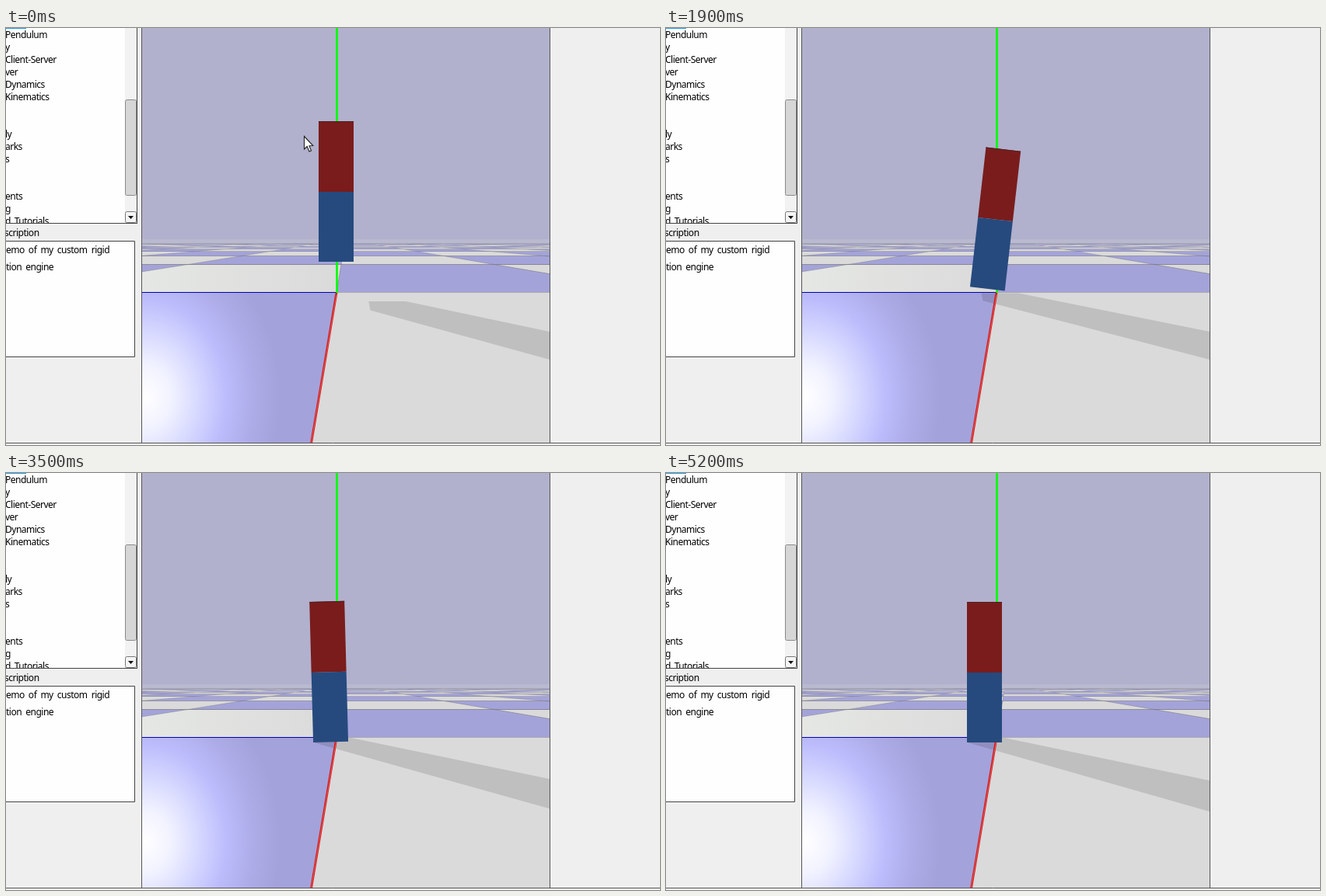
These frames come from a looping animation (841x537 px, 5300 ms). An HTML page with a canvas:

```html
<!DOCTYPE html>
<html lang="en">
<head>
<meta charset="utf-8">
<title>Rigid body demo</title>
<style>
  html, body { margin: 0; width: 100%; height: 100%; overflow: hidden; background: #efefef; }
  canvas { display: block; }
</style>
</head>
<body>
<canvas id="stage" width="841" height="537"></canvas>
<script>
const ctx = document.getElementById('stage').getContext('2d');
const LOOP = 5300, STEP = 100, REST = 200;

const ROWS = ['Pendulum', 'y', 'Client-Server', 'ver', 'Dynamics', 'Kinematics', '', '',
  'ly', 'arks', 's', '', '', 'ents', 'g', 'd_Tutorials'];

// --- motion ---
const ramp = (t, from, to) => Math.min(1, Math.max(0, (t - from) / (to - from)));
const smooth = p => p * p * (3 - 2 * p);
const mix = (a, b, p) => a + (b - a) * p;
const drift = t => smooth(ramp(t, 2500, 4300));

// Free fall, a low hop, then sinking into contact.
function height(t) {
  if (t <= 800) return mix(210.5, 238.5, ramp(t, REST, 800) ** 2);
  if (t < 1900) {
    const q = ramp(t, 900, 1900);
    return 246 - 30 * q * (1 - q);
  }
  return 256.5 - 10.5 * Math.exp((1900 - t) / 546);
}

// Steady tilt while hopping, then a damped swing back upright.
function tilt(t) {
  const u = ramp(t, 2100, 4300);
  const deg = t < 2100
    ? 7.8 * ramp(t, 900, 2100)
    : 7.8 * Math.cos(Math.PI * u * 22 / 23) * (1 - u * u);
  return deg * Math.PI / 180;
}

function pose(t) {
  return {
    x: 424.5 - 1.5 * ramp(t, 900, 2500) - 13.5 * drift(t),
    y: height(t),
    angle: tilt(t)
  };
}

// --- drawing helpers ---
function rect(color, x, y, w, h) {
  ctx.fillStyle = color;
  ctx.fillRect(x, y, w, h);
}

function trace(pts) {
  ctx.beginPath();
  pts.forEach(([x, y]) => ctx.lineTo(x, y));
  ctx.closePath();
}

function poly(fill, ...pts) {
  trace(pts);
  ctx.fillStyle = fill;
  ctx.fill();
}

function line(color, width, x1, y1, x2, y2) {
  ctx.beginPath();
  ctx.moveTo(x1, y1);
  ctx.lineTo(x2, y2);
  ctx.strokeStyle = color;
  ctx.lineWidth = width;
  ctx.stroke();
}

function box(fill, border, x, y, w, h, r) {
  ctx.beginPath();
  ctx.roundRect(x + 0.5, y + 0.5, w - 1, h - 1, r);
  ctx.fillStyle = fill;
  ctx.fill();
  ctx.strokeStyle = border;
  ctx.lineWidth = 1;
  ctx.stroke();
}

function clipped(x, y, w, h, draw) {
  ctx.save();
  ctx.beginPath();
  ctx.rect(x, y, w, h);
  ctx.clip();
  draw();
  ctx.restore();
}

// --- floor in perspective ---
const VP = { x: 436.5, y: 272 };
const rowY = n => VP.y + 62.1 / (0.9 + n);
const colX = (k, y) => VP.x + (y - VP.y) * (6.05 * k - 0.166);

function drawFloor() {
  rect('#dadada', 175, 277, 525, 258);
  for (let n = 11; n >= 0; n--) {
    const far = Math.max(rowY(n + 1), 277), near = rowY(n);
    const reach = Math.ceil(270 / (6.05 * (far - VP.y))) + 1;
    const ink = `rgba(115,115,125,${0.7 / (1 + n * 0.3)})`;
    for (let k = -reach; k <= reach; k++) {
      if ((k + n) % 2 === 0) {
        poly('#a4a3d9', [colX(k, far), far], [colX(k + 1, far), far],
          [colX(k + 1, near), near], [colX(k, near), near]);
      }
      if (n < 5) line(ink, 0.8, colX(k, far), far, colX(k, near), near);
    }
    const edge = Math.floor(far) + 0.5;
    line(ink, 1, 175, edge, 700, edge);
  }
  line('#a9a9b4', 1, 425, 340.5, 700, 340.5);

  const sheen = ctx.createLinearGradient(175, 0, 425, 0);
  sheen.addColorStop(0, 'rgba(236,240,234,.6)');
  sheen.addColorStop(1, 'rgba(236,240,234,0)');
  poly(sheen, [175, 314], [colX(-1, 305), 305], [430, 305], [425, 340], [175, 340]);
}

function drawGlow() {
  ctx.save();
  trace([[175, 341], [425, 341], [393, 535], [175, 535]]);
  ctx.clip();
  ctx.translate(178, 475);
  ctx.scale(1, 1.2);
  const glow = ctx.createRadialGradient(0, 0, 0, 0, 0, 175);
  ['#ffffff', '#f1f2ff', '#d6d8ff', '#bcbcfc', '#adace8', '#a4a2da']
    .forEach((color, i) => glow.addColorStop(i / 5, color));
  rect(glow, -10, -180, 270, 360);
  ctx.restore();
}

// The tip follows the foot of the stack and slides out with its lift.
function drawShadow(t, body) {
  const lift = 256.5 - body.y;
  const x = body.x - 90 * Math.sin(body.angle) - 22.5 + 1.4 * lift;
  const y = 341 + 0.0052 * lift * lift;
  poly('rgba(0,0,0,.125)', [x, y], [x + 48, y],
    [699, 391 + 5 * drift(t)], [699, 427 + 9 * drift(t)], [x + 2, 347.5 + 0.35 * lift]);
}

function drawAxes() {
  rect('#0000b0', 175, 340, 250, 1);
  line('#00ff00', 2.6, 425.5, 0, 425.5, 341);
  line('#d01414', 2.8, 425, 341, 392.5, 535);
  line('#ee7070', 0.8, 425, 343, 392.5, 535);
}

function drawBody({ x, y, angle }) {
  ctx.save();
  ctx.translate(x, y);
  ctx.rotate(angle);
  rect('#7a1c1c', -22.5, -90.5, 45, 91);
  rect('#264a7e', -22.5, 0.5, 45, 90);
  rect('#4a2026', -22.5, -90.5, 45, 1);
  ctx.restore();
}

function drawScene(t) {
  const body = pose(t);
  rect('#b1b1cd', 175, 0, 525, 272);
  rect('#b9b9d0', 175, 272, 525, 5);
  drawFloor();
  drawGlow();
  drawShadow(t, body);
  drawAxes();
  drawBody(body);
}

function drawPanel() {
  rect('#fefefe', 0, 0, 153, 251);
  rect('#1e9be0', 0, 0, 26, 1);
  rect('#f2f2f2', 153, 0, 15, 251);
  box('#d6d6d6', '#8a8a8a', 153, 92, 15, 124, 2);
  box('#f4f4f4', '#777', 153, 236, 15, 15, 2);
  poly('#111', [157, 242], [164, 242], [160.5, 246]);
  line('#444', 1, 168.5, 0, 168.5, 251);
  line('#444', 1, 0, 251.5, 169, 251.5);
  box('#fefefe', '#444', -2, 274, 168, 150, 0);

  ctx.font = '12px "Noto Sans", "Open Sans", sans-serif';
  ctx.letterSpacing = '-0.5px';
  ctx.wordSpacing = '2.5px';
  ctx.fillStyle = '#000';
  clipped(0, 0, 153, 251, () => ROWS.forEach((row, i) => ctx.fillText(row, -1, 13 + 16 * i)));
  ctx.fillText('scription', -2, 268);
  ctx.fillText('emo of my custom rigid', 0, 290);
  ctx.fillText('tion engine', 0, 312);
}

// The pointer leaves towards the upper left during the hop.
function drawPointer(t) {
  if (t >= 1900) return;
  const p = smooth(ramp(t, 1400, 1800));
  ctx.save();
  ctx.translate(Math.round(mix(383, 189, p)) + 0.5, Math.round(mix(139, 31, p)) + 0.5);
  trace([[0, 0], [0, 16.5], [3.7, 13], [6.5, 19.5], [9, 18.5], [6.4, 12.3], [11.3, 12]]);
  ctx.fillStyle = '#fff';
  ctx.fill();
  ctx.strokeStyle = '#222';
  ctx.lineWidth = 1.1;
  ctx.stroke();
  ctx.restore();
}

function draw(t) {
  rect('#efefef', 0, 0, 841, 537);
  clipped(175, 0, 525, 535, () => drawScene(t));
  drawPanel();
  line('#555', 1, 174.5, 0, 174.5, 534);
  line('#555', 1, 699.5, 0, 699.5, 534);
  line('#555', 1, 0, 534.5, 841, 534.5);
  drawPointer(t);
}

const start = performance.now();
let shown = -1;
function tick() {
  const t = (performance.now() - start) % LOOP;
  const step = Math.max(REST, Math.floor(t / STEP) * STEP);
  if (step !== shown) draw(shown = step);
  requestAnimationFrame(tick);
}
tick();
</script>
</body>
</html>
```
